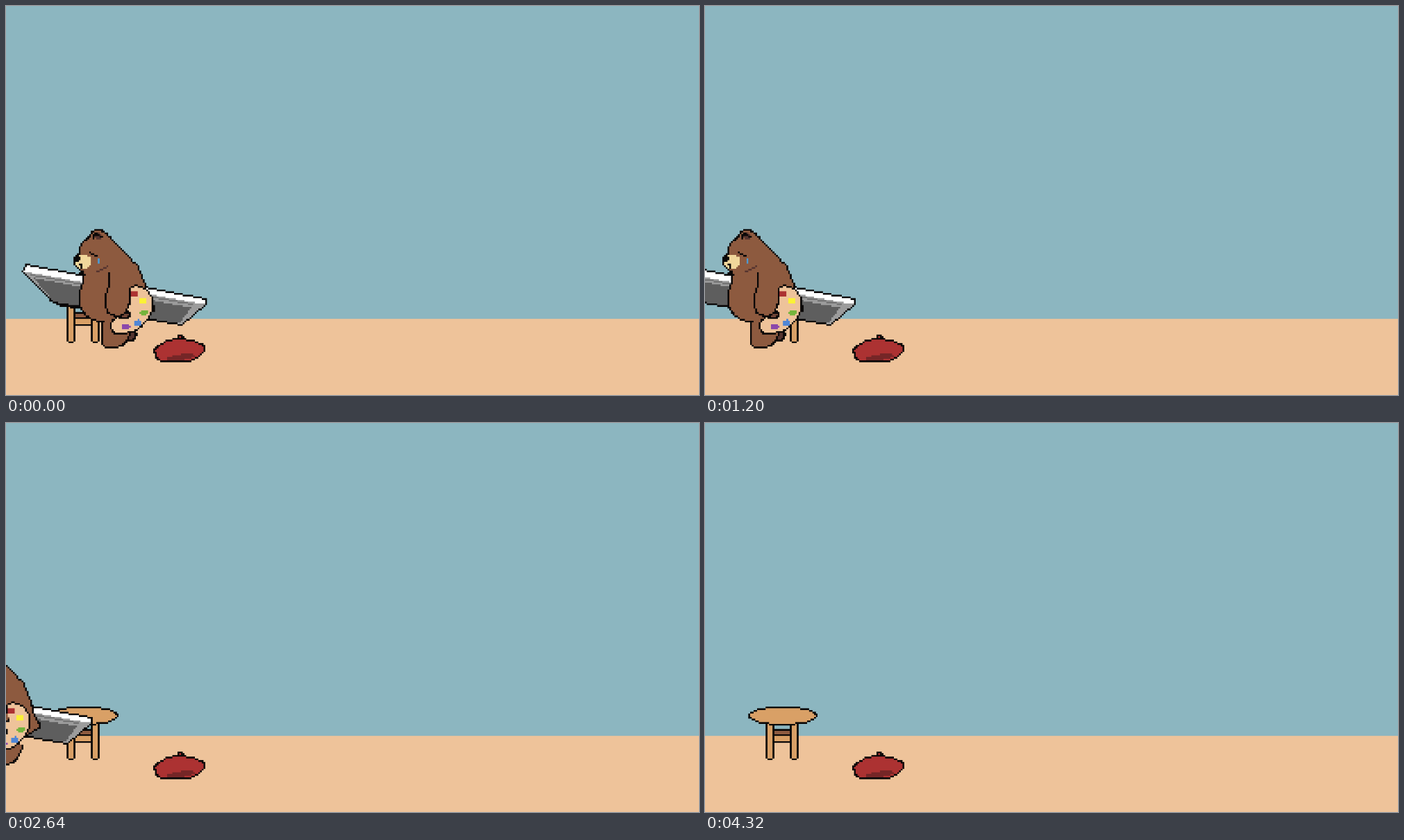
Recreate the animation shown at these times as an HTML page with a canvas. Size 998 by 561 pixels, loop 4.38 s.

```html
<!DOCTYPE html>
<html lang="en">
<head>
<meta charset="utf-8">
<title>Sad painter bear</title>
<style>
  html, body { margin: 0; width: 100%; height: 100%; overflow: hidden; background: #8cb6c0; }
  canvas { display: block; width: 998px; height: 561px; }
</style>
</head>
<body>
<canvas width="1600" height="900"></canvas>
<script>
const ctx = document.querySelector('canvas').getContext('2d');
ctx.scale(4, 4);           // the art is 400 x 225 pixels, scaled down smoothly
const PX = 998 / 400;      // stage pixels per art pixel
const STEP = 120, LOOP = 4380;
const INK = '#0a0808', FUR = '#8d5a3f', DARK_FUR = '#55342f', WOOD = '#d9a066', SAND = '#eec39a';

function rect(color, x, y, w, h) {
  ctx.fillStyle = color;
  ctx.fillRect(x, y, w, h);
}

// Shapes are lists of points in stage pixels.
const poly = text => text.split(' ').map(p => p.split(',').map(Number));

function ellipse(cx, cy, rx, ry, tilt = 0) {
  const cos = Math.cos(tilt), sin = Math.sin(tilt);
  return Array.from({ length: 60 }, (_, i) => {
    const a = i / 60 * 2 * Math.PI, x = rx * Math.cos(a), y = ry * Math.sin(a);
    return [cx + x * cos - y * sin, cy + x * sin + y * cos];
  });
}

// Catmull-Rom spline through a few key points.
function curve(text, closed = true) {
  const keys = poly(text), n = keys.length, out = [];
  const key = i => keys[closed ? (i + n) % n : Math.min(n - 1, Math.max(0, i))];
  for (let i = 0; i < (closed ? n : n - 1); i++) {
    const [a, b, c, d] = [-1, 0, 1, 2].map(k => key(i + k));
    for (let t = 0; t < 1; t += 1 / 8)
      out.push([0, 1].map(k => b[k] + t / 2 * (c[k] - a[k]
        + t * (2 * a[k] - 5 * b[k] + 4 * c[k] - d[k] + t * (3 * (b[k] - c[k]) + d[k] - a[k])))));
  }
  return closed ? out : [...out, keys[n - 1]];
}

function fillPixels(color, pts) {
  const ys = pts.map(p => p[1]);
  for (let y = Math.min(...ys); y < Math.max(...ys); y++) {
    const hits = [];
    pts.forEach(([x0, y0], i) => {
      const [x1, y1] = pts[(i + 1) % pts.length];
      if ((y0 <= y) !== (y1 <= y)) hits.push(x0 + (y - y0) * (x1 - x0) / (y1 - y0));
    });
    hits.sort((a, b) => a - b);
    for (let i = 0; i + 1 < hits.length; i += 2) {
      const left = Math.round(hits[i]);
      rect(color, left, y, Math.round(hits[i + 1]) - left + 1, 1);
    }
  }
}

function linePixels(color, pts, closed) {
  for (let i = closed ? 0 : 1; i < pts.length; i++) {
    const [x0, y0] = pts[(i || pts.length) - 1], [x1, y1] = pts[i];
    const n = Math.max(Math.abs(x1 - x0), Math.abs(y1 - y0), 1);
    for (let k = 0; k <= n; k++)
      rect(color, Math.round(x0 + (x1 - x0) * k / n), Math.round(y0 + (y1 - y0) * k / n), 1, 1);
  }
}

// A pen snaps shapes to the art grid and moves them by a rule in art pixels.
function pen(move = (x, y) => [x, y]) {
  const place = pts => pts.map(([x, y]) =>
    move(Math.floor(x / PX), Math.floor(y / PX)).map(Math.round));
  return {
    fill: (color, pts) => fillPixels(color, place(pts)),
    line: (pts, color = INK, closed = false) => linePixels(color, place(pts), closed),
    shape(color, pts) { this.fill(color, pts); this.line(pts, INK, true); },
    limb(color, pts) { this.fill(color, pts); this.line(pts); }
  };
}

function drawStool(p) {
  p.shape(WOOD, poly('97,451 125,451 125,460 97,460'));
  p.shape(FUR, poly('97,442 125,442 125,450 97,450'));
  for (const x of [88, 123])
    p.shape(WOOD, [[x, 430], [x + 10, 430], [x + 10, 482], [x + 8, 485], [x + 2, 485], [x, 482]]);
  p.shape(WOOD, ellipse(112, 422.5, 48.5, 12.5));
}

function drawBeret(p) {
  p.shape('#ac3232', ellipse(251, 480, 4, 4.5));
  const cap = curve('216,494 233,483 252,481 270,484 286,493 271,510 245,512 222,511 215,502');
  p.fill('#ac3232', cap);
  p.fill('#752627', ellipse(252, 508, 19, 4, -.12));
  p.line(cap, INK, true);
}

function drawBoard(p) {
  const rim = poly('29,373 288,423 288,430 254,460 68,428 24,382');
  p.fill('#9c9c9c', rim);
  p.fill('#5e5e5e', poly('42,394 266,436 248,457 72,427'));
  p.line(poly('36,388 268,430'), '#747474');
  p.fill('#ffffff', poly('29,374 288,424 285,431 26,384'));
  p.line(rim, INK, true);
}

function drawHead(p) {
  p.fill(DARK_FUR, ellipse(133, 333, 5, 4, .5));
  p.line(curve('125,335 130,329 138,334', false));
  p.line(poly('122,355 130,360'));
  p.line(poly('133,365 133,370'), '#4d9ad3');
  p.line(poly('131,383 147,376'), DARK_FUR);
  p.fill('#f1d79b', ellipse(111, 370, 11, 10));
  p.fill(INK, ellipse(102, 366, 4, 4));
  p.line(poly('106,374 109,372 109,378'));
  p.line(poly('106,385 113,387'));
}

function drawPalette(p) {
  p.shape(SAND, curve('180,406 197,406 209,419 210,440 197,460 177,471 155,471 153,455 172,442 178,425'));
  ['#ac3232', '#fbf236', '#74b43c', '#4f86d6', '#8b48ab'].forEach((color, i) => {
    const angle = (40 * i - 65) * Math.PI / 180, r = 23 + i;
    p.fill(color, ellipse(175 + r * Math.cos(angle), 437 + r * Math.sin(angle), 5, 4, -.5));
  });
}

function drawBear(dx, turn) {
  const swing = 2.8 * (Math.cos(turn) - 1);
  const shifted = (ox, oy = 0) => pen((x, y) => [x - dx + ox, y + oy]);
  const body = shifted(0), held = shifted(swing);
  const arm = pen((x, y) => [x - dx + swing * Math.min(1, Math.max(0, (y - 155) / 20)), y]);

  shifted(8 * Math.cos(turn), -2 * Math.max(0, Math.cos(turn)))
    .shape(DARK_FUR, ellipse(159, 481, 9, 7, -.7));
  body.shape(FUR, curve('134,323 145,329 160,345 188,374 198,395 205,420 213,437 203,445 176,460 128,453 110,440 106,418 112,390 106,380 98,370 99,363 106,357 108,344 119,334 126,325'));
  shifted(2.4 * Math.cos(turn - .6 * Math.PI) + .7)
    .limb(FUR, curve('138,456 139,474 140,490 160,492 173,485 181,466', false));
  drawHead(body);
  drawPalette(held);
  held.shape('#704536', ellipse(171, 446, 8, 5, -.2));
  arm.limb(FUR, curve('148,386 149,400 144,418 146,440 158,447 171,444 178,428', false));
}

// Each walk cycle of five poses starts at its own place.
const CYCLE_START = [0, 13, 29, 45, 61, 82, 99, 113];

function draw(step) {
  const pose = step % 5, turn = pose / 5 * 2 * Math.PI;
  const dx = CYCLE_START[Math.floor(step / 5)] + Math.round(2.5 * pose);
  const dip = (1 - Math.cos(turn)) / 2;
  rect('#8cb6c0', 0, 0, 400, 181);
  rect(SAND, 0, 181, 400, 44);
  drawStool(pen());
  drawBeret(pen());
  drawBoard(pen((x, y) => [x - dx, y + Math.round(dip)]));
  drawBear(dx, turn);
}

const start = performance.now();
let shown = -1;
function tick() {
  const step = Math.floor((performance.now() - start) % LOOP / STEP);
  if (step !== shown) draw(shown = step);
  requestAnimationFrame(tick);
}
tick();
</script>
</body>
</html>
```
